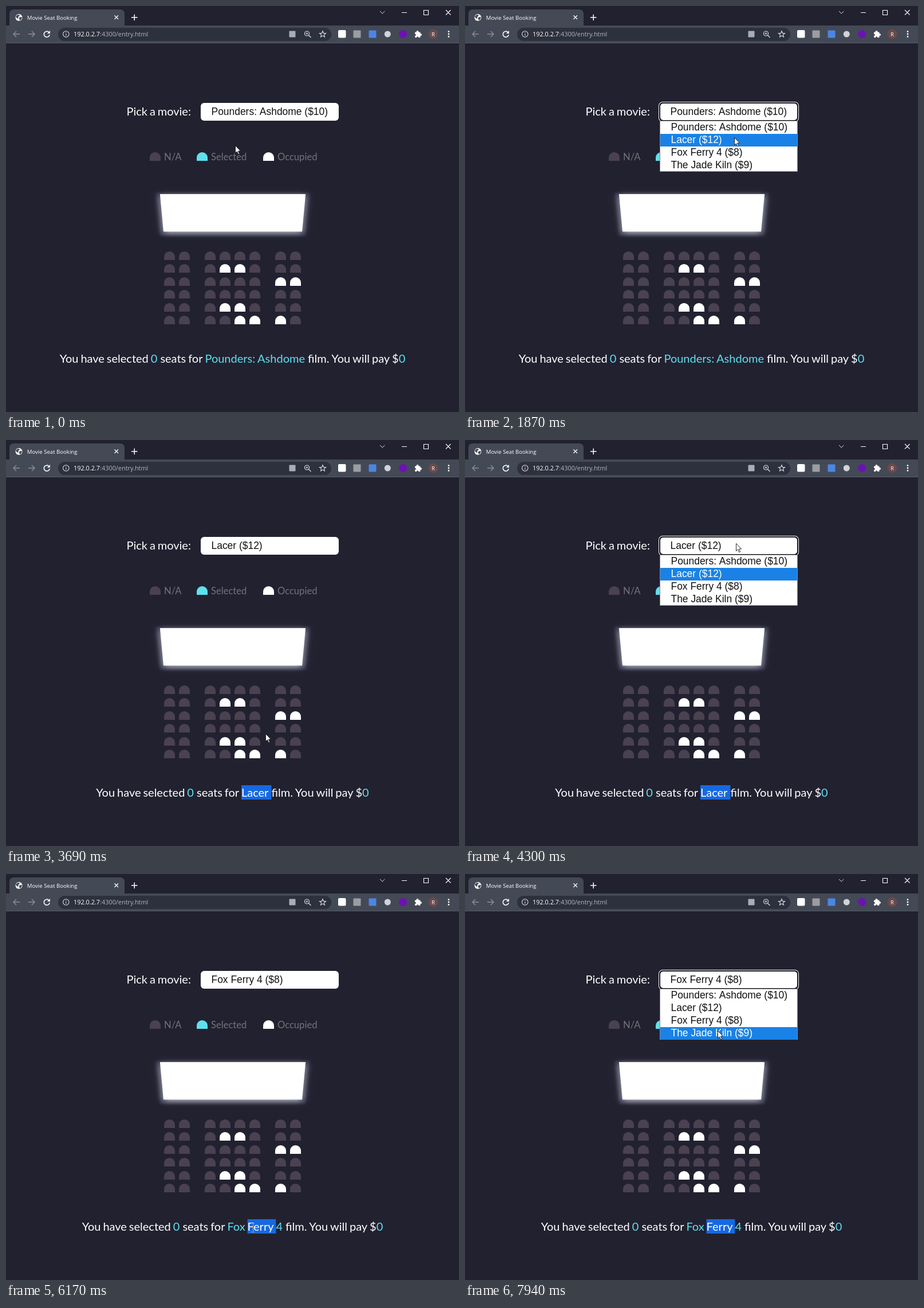
Animation of 791 by 708 pixels, one loop 8 s. Source, as an HTML page with a canvas:

```html
<!DOCTYPE html>
<html lang="en">
<head>
<meta charset="utf-8">
<title>Movie Seat Booking</title>
<style>
  html, body { margin: 0; width: 100%; height: 100%; overflow: hidden; background: #222130; }
  canvas { position: absolute; left: 0; top: 0; }
  .hall { position: absolute; left: 272.2px; top: 318.4px; width: 247.5px; height: 240.6px; perspective: 1247px; }
  .screen {
    height: 87.3px; background: #fff; transform: rotateX(-45deg);
    box-shadow: 0 3.7px 12.5px rgba(255, 255, 255, .65), 0 3.7px 4px 7px rgba(90, 95, 135, .3);
  }
</style>
</head>
<body>
<div class="hall"><div class="screen"></div></div>
<canvas id="stage" width="791" height="708"></canvas>
<script>
const ctx = document.getElementById('stage').getContext('2d');
const LOOP = 8000;
const WHITE = '#fff', CYAN = '#5fe0ee', SEAT = '#4a4151', BAR = '#444956', MUTED = '#8b8f99', ICON = '#dfe1e5';
const LATO = '20px Lato, sans-serif';
const LEGEND = '16.6px Lato, sans-serif';
const OPTION = '17.46px "Liberation Sans", Arial, sans-serif';
const UI = 'px "Open Sans", sans-serif';

const movies = [
  ['Pounders: Ashdome', 10],
  ['Lacer', 12],
  ['Fox Ferry 4', 8],
  ['The Jade Kiln', 9],
];
const columns = [276, 302, 347, 373, 399, 425, 470, 496];
const occupied = ['13', '14', '26', '27', '43', '44', '54', '55', '56'];

// Pointer moves: start, end, target x, target y
const moves = [
  [400, 880, 491, 177],
  [1320, 1870, 470, 229],
  [2200, 2980, 448, 617],
  [2990, 3160, 446, 621],
  [3630, 4200, 473, 180],
  [4400, 4550, 449, 254],
  [5080, 5860, 431, 615],
  [5880, 6050, 431, 617],
  [6860, 7400, 461, 181],
  [7640, 7940, 441, 273],
];

const within = (t, ...spans) => spans.some(([from, to]) => t >= from && t < to);

function rect(x, y, w, h, color, radius = 0) {
  ctx.fillStyle = color;
  ctx.beginPath();
  ctx.roundRect(x, y, w, h, radius);
  ctx.fill();
}

function disc(x, y, r, color) {
  rect(x - r, y - r, 2 * r, 2 * r, color, r);
}

function stroke(path, color = ICON, width = 1.2) {
  ctx.strokeStyle = color;
  ctx.lineWidth = width;
  ctx.stroke(new Path2D(path));
}

function fill(path, color) {
  ctx.fillStyle = color;
  ctx.fill(new Path2D(path));
}

// Page copy is set with slightly tight word spaces
function setFont(font) {
  ctx.font = font;
  ctx.wordSpacing = font === LATO ? '-1.2px' : '0px';
}

// Draws text on its baseline and returns the x where it ends
function text(string, x, y, font, color) {
  setFont(font);
  ctx.fillStyle = color;
  ctx.fillText(string, x, y);
  return x + ctx.measureText(string).width;
}

function seat(x, y, color) {
  rect(x, y, 19, 15, color, [9.5, 9.5, 0, 0]);
}

function drawBrowser() {
  // Tab strip and window buttons
  rect(6, 6, 201, 30, BAR, [7, 7, 0, 0]);
  rect(0, 34, 791, 30, BAR);
  rect(0, 64, 791, 1, '#575b67');
  disc(22.5, 20, 6, WHITE);
  fill('M18 17l3-2 3 1-1 2-2 1 1 2-2 1-3-3zM23 20l4-1 1 1-2 4-2 1-1-3z', BAR);
  text('Movie Seat Booking', 36.8, 24, 9.6 + UI, WHITE);
  stroke('M189.5 16.5l6.5 6.5m0-6.5l-6.5 6.5', WHITE, 1.3);
  stroke('M219 20h10.5m-5.25-5.25v10.5', WHITE, 1.5);
  stroke('M653 9l4.2 4.2 4.2-4.2', ICON, 1);
  stroke('M691 11.5h9M729.5 7.5h8v8h-8zM768 7l8.5 8.5m0-8.5l-8.5 8.5', WHITE, 1.1);

  // Navigation and address
  stroke('M24 49h-11m5-5l-5 5 5 5M39 49h11m-5-5l5 5-5 5', MUTED, 1.4);
  stroke('M75 45.8a5 5 0 1 0 1.2 4.4', WHITE, 1.6);
  fill('M77 43v5h-5z', WHITE);
  rect(91, 38, 477, 23, '#2d303d', 11.5);
  stroke('M110 49a5.2 5.2 0 1 1-10.4 0a5.2 5.2 0 1 1 10.4 0M104.8 48.2v3.6M104.8 45.7v1.3', ICON, 1.1);
  const portX = text('192.0.2.7', 118, 53, 10.9 + UI, WHITE);
  text(':4300/entry.html', portX, 53, 10.9 + UI, '#b4b7be');
  rect(494.5, 43.5, 11, 11, '#a9adb5', 1);
  stroke('M529.5 48a4 4 0 1 1-8 0a4 4 0 1 1 8 0M528.5 51l4 4M523.7 48h3.6M525.5 46.2v3.6', ICON);
  let star = '';
  for (let i = 0; i < 10; i++) {
    const r = i % 2 ? 2.5 : 5.8, a = i * Math.PI / 5;
    star += (i ? 'L' : 'M') + (553 + r * Math.sin(a)) + ' ' + (49.4 - r * Math.cos(a));
  }
  stroke(star + 'z', ICON, 1.1);

  // Extensions and menu
  rect(580, 42, 13.5, 13.5, WHITE, 2);
  rect(606.5, 42.5, 13, 13, '#9b9da1', 1);
  rect(633.5, 42.5, 13, 13, '#4b86e6', 1);
  disc(666.3, 49, 5.5, '#d0d3d8');
  disc(693.3, 49, 7, '#6c12b4');
  rect(714, 45.5, 9.5, 9.5, WHITE, 1);
  disc(718.5, 45, 2, WHITE);
  disc(724, 50, 2, WHITE);
  disc(714.3, 50.3, 1.6, BAR);
  disc(718.7, 54.8, 1.6, BAR);
  disc(746, 49, 8.5, '#6a4a4a');
  text('R', 743, 52.6, 9.5 + UI, WHITE);
  for (const y of [44.6, 49, 53.4]) disc(773, y, 1.4, WHITE);
}

function drawHall() {
  text('Pick a movie:', 210.5, 191, LATO, WHITE);
  [['N/A', 251, SEAT], ['Selected', 333, CYAN], ['Occupied', 449, WHITE]].forEach(([label, x, color]) => {
    seat(x, 255, color);
    text(label, x + 25, 269, LEGEND, '#74737a');
  });
  for (let row = 0; row < 6; row++) {
    columns.forEach((x, col) => {
      seat(x, Math.round(428 + 22.4 * row), occupied.includes(`${row}${col}`) ? WHITE : SEAT);
    });
  }
}

function drawSummary(title, marked) {
  const parts = [['You have selected ', WHITE], ['0', CYAN], [' seats for ', WHITE]];
  for (const word of title.split(/(?<= )/)) parts.push([word, CYAN, word === marked]);
  parts.push([' film. You will pay $', WHITE], ['0', CYAN]);
  setFont(LATO);
  const width = s => ctx.measureText(s).width;
  let x = 395.5 - parts.reduce((sum, [s]) => sum + width(s), 0) / 2;
  for (const [string, color, selected] of parts) {
    if (selected) {
      const space = string.endsWith(' ') ? 0 : width(' ');
      rect(x, 602, width(string) + space, 25, '#1669e2');
    }
    x = text(string, x, 622, LATO, selected ? WHITE : color);
  }
}

function drawSelect(picked, focused, open, pointerY) {
  const label = ([title, price]) => `${title} ($${price})`;
  if (focused) {
    rect(338, 167, 245, 35, WHITE, 7);
    rect(339, 168, 243, 33, '#14141c', 6);
    rect(341, 170, 239, 29, WHITE, 5);
  } else {
    rect(340, 169, 241, 31, WHITE, 6);
  }
  text(label(movies[picked]), 358.5, 190, OPTION, '#111');
  if (!open) return;
  rect(340, 200, 241, 89, '#8a8a8a');
  rect(341, 201, 239, 87, WHITE);
  const hovered = pointerY > 201 ? Math.min(3, Math.floor((pointerY - 201) / 22)) : picked;
  movies.forEach((movie, i) => {
    const y = 201 + 22 * i;
    if (i === hovered) rect(341, y, 239, 22, '#1a82e6');
    text(label(movie), 359.5, y + 16, OPTION, i === hovered ? WHITE : '#111');
  });
}

function pointerAt(t) {
  let x = 400, y = 243;
  for (const [start, end, toX, toY] of moves) {
    if (t <= start) break;
    const u = Math.min(1, (t - start) / (end - start));
    const eased = 1 - (1 - u) ** 2.5;
    x += (toX - x) * eased;
    y += (toY - y) * eased;
  }
  return [x, y];
}

function drawPointer(x, y) {
  ctx.save();
  ctx.translate(Math.round(x), Math.round(y));
  if (y > 603 && y < 628) {
    ctx.globalCompositeOperation = 'difference';
    stroke('M-3 -7.5h2.5m1 0h2.5M.5 -7v14M-3 7.5h2.5m1 0h2.5', WHITE, 1);
  } else {
    const arrow = 'M.5 .5V13.6L3.5 10.8L5.7 15.8L7.7 14.9L5.5 10H9.6Z';
    fill(arrow, WHITE);
    stroke(arrow, '#15151c', .9);
  }
  ctx.restore();
}

function draw(now) {
  const t = now % LOOP;
  const [x, y] = pointerAt(t);
  const picked = t < 2200 ? 0 : t < 5080 ? 1 : 2;
  const open = within(t, [1140, 2200], [4230, 5080], [7440, LOOP]);
  const focused = within(t, [1140, 3100], [4230, 5980], [7440, LOOP]);
  const marked = within(t, [3360, 5080]) ? 'Lacer' : t >= 6110 ? 'Ferry ' : null;

  ctx.clearRect(0, 0, 791, 708);
  drawBrowser();
  drawHall();
  drawSummary(movies[picked][0], marked);
  drawSelect(picked, focused, open, y);
  drawPointer(x, y);
  requestAnimationFrame(draw);
}
requestAnimationFrame(draw);
</script>
</body>
</html>
```
